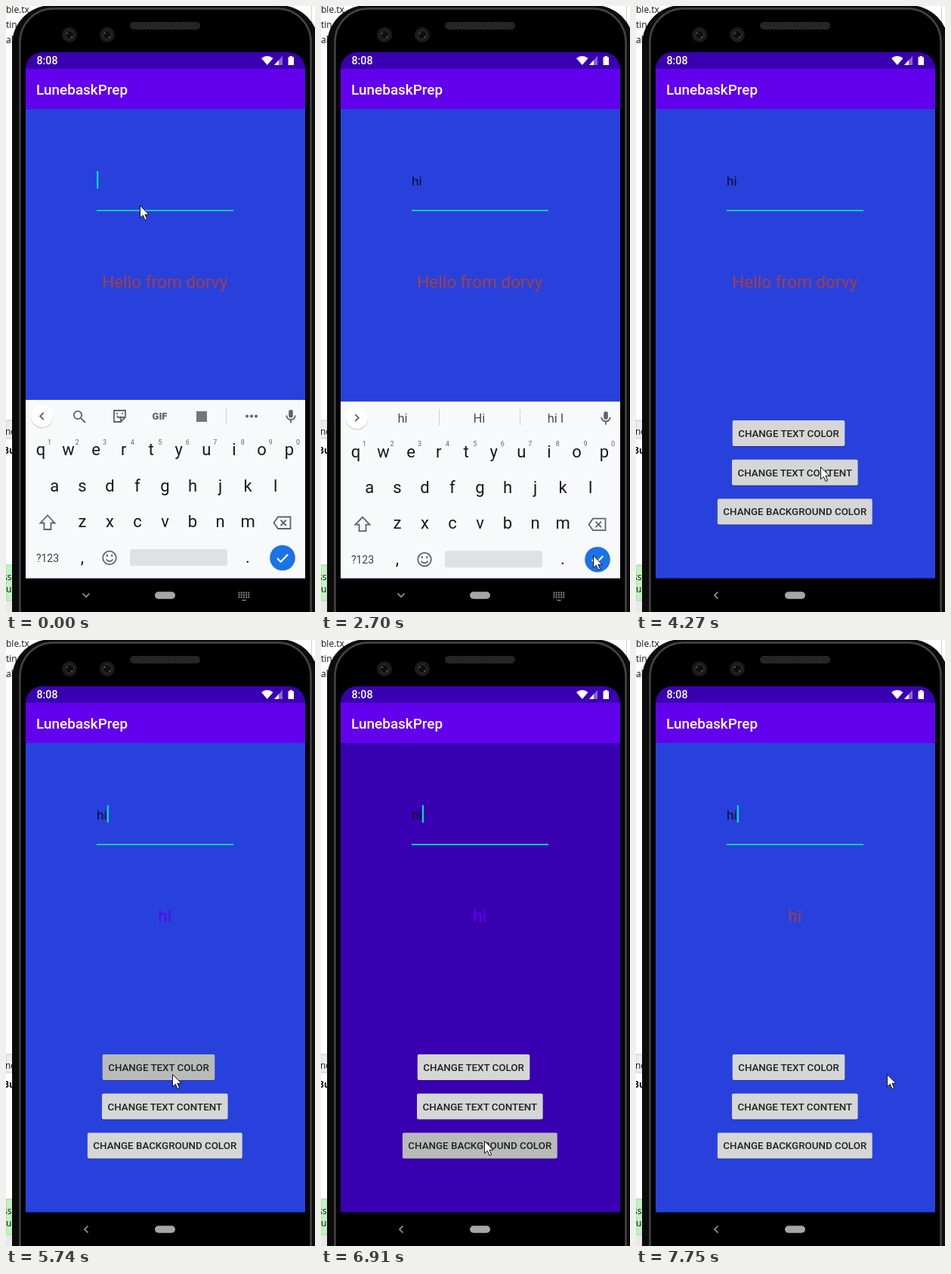
Recreate the animation shown at these times as an HTML page. Size 409 by 800 pixels, loop 8000 ms.

```html
<!DOCTYPE html>
<html lang="en">
<head>
<meta charset="utf-8">
<title>Phone screen</title>
<style>
  html, body { margin: 0; width: 100%; height: 100%; overflow: hidden; background: #fff; }
  svg { display: block; width: 409px; height: 800px; font-family: Roboto, sans-serif; }
  .mid, .key, .digit, .label, .word { text-anchor: middle; }
  .desk { font: 12px "Open Sans", sans-serif; fill: #111; }
  .key { font-size: 22px; fill: #17181a; }
  .digit { font-size: 9px; fill: #5f6368; }
  .label { font-size: 13.35px; font-weight: 500; fill: #222; }
  .word { font-size: 16.5px; fill: #4a4d52; }
  .icon { fill: none; stroke: #5f6368; stroke-width: 1.8; }
</style>
</head>
<body>
<svg viewBox="0 0 409 800">
  <defs>
    <clipPath id="display"><path d="M26 755.5V83a22 22 0 0 1 22-22H374a22 22 0 0 1 22 22V755.5z"/></clipPath>
    <pattern id="mesh" width="4" height="4" patternUnits="userSpaceOnUse">
      <rect width="4" height="4" fill="#1b1b1b"/><path d="M0 4L4 0M0 0l4 4" stroke="#343434" stroke-width=".8"/>
    </pattern>
  </defs>

  <!-- desktop behind the phone -->
  <rect width="409" height="800" fill="#fff"/>
  <path d="M404.5 0V60" stroke="#d0d0d0"/>
  <rect y="547" width="30" height="24" fill="#ececec" stroke="#c8c8c8"/>
  <rect y="738" width="30" height="47" fill="#c2f2c1" stroke="#9ccf9c"/>
  <rect y="786" width="30" height="14" fill="#e8e8e8"/>
  <g class="desk">
    <text y="9">ble.tx</text><text y="29">tin</text><text y="49">al</text>
    <text x="-1" y="566">nc</text><text x="-4" y="591" font-weight="700">Bu</text>
    <text x="-4" y="758">ss</text><text y="774">u</text>
  </g>

  <!-- phone body -->
  <rect x="8" y="-1" width="406" height="900" rx="52" fill="#0b0b0b"/>
  <rect x="18.5" y="3.5" width="385" height="900" rx="44" fill="#000" stroke="#444" stroke-width="2.5"/>
  <rect x="164" y="21" width="93" height="10" rx="5" fill="url(#mesh)"/>
  <g id="lenses"></g>

  <g clip-path="url(#display)">
    <rect id="page" x="26" y="136" width="370" height="620"/>
    <rect x="26" y="61" width="370" height="22" fill="#3900b1"/>
    <rect x="26" y="83" width="370" height="53" fill="#6200ee"/>
    <text x="40.500" y="77" font-size="14.200" font-weight="500" fill="#fff">8:08</text>
    <text x="40" y="117" font-size="18.900" font-weight="500" fill="#fff">LunebaskPrep</text>
    <g fill="#fff">
      <path d="M338 69q7.700-6 15.500 0L345.800 78z"/>
      <path d="M366 66v12H355z" opacity=".4"/><path d="M361 71.500V78H355z"/>
      <path d="M373.500 67.500h2v-1.500h3.500v1.500h2V78h-7.500z"/>
    </g>

    <text id="field" x="120" y="236.700" font-size="17.300" fill="#0b0c22"></text>
    <rect id="composing" x="120" y="238" height="1" fill="#0b0c22"/>
    <rect x="120" y="269" width="181" height="2" fill="#0cc9c9"/>
    <rect id="caret" y="218" width="2.300" height="23" fill="#06d3c8"/>
    <text id="message" class="mid" x="210.300" y="372" font-size="22.600"></text>
    <g id="buttons"></g>

    <g id="keyboard">
      <rect x="26" y="520" width="370" height="236" fill="#f7f9fb"/>
      <circle cx="47.500" cy="542.800" r="14.800" fill="#d5d7da"/>
      <circle cx="47.500" cy="541.500" r="14.500" fill="#fff"/>
      <path id="chevron" class="icon" d="M2.300-4.500L-2.300 0 2.300 4.500"/>
      <g id="tools">
        <circle class="icon" cx="95" cy="540" r="5.200"/><path class="icon" d="M99 544l6 6"/>
        <path class="icon" d="M143 534h15v9l-6 6h-9zM158 543h-6v6M147 541q2 4 5 1M147 537v2M154 537v2"/>
        <text class="mid" x="203.500" y="546" font-size="13" font-weight="900" fill="#5f6368">GIF</text>
        <rect x="252" y="535" width="14" height="14" fill="#73767a"/>
        <path d="M291.500 531V552" stroke="#cfd2d6"/>
        <path d="M319 541.500h13" stroke="#5f6368" stroke-width="4" stroke-linecap="round" stroke-dasharray="0 6"/>
      </g>
      <g id="suggestions">
        <path d="M156.500 530V552M263.500 530V552" stroke="#cfd2d6"/>
        <text class="word" x="108" y="547.500"></text>
        <text class="word" x="209.500" y="547.500"></text>
        <text class="word" x="310.500" y="547.500"></text>
      </g>
      <rect x="374.200" y="533" width="5.600" height="10.500" rx="2.800" fill="#5f6368"/>
      <path class="icon" d="M371.300 540.500a5.700 5.700 0 0 0 11.400 0M377 546.500v4"/>
      <g id="keys"></g>
      <path class="icon" d="M55 672.500l-9.500 10h5v8.500h9v-8.500h5z"/>
      <path class="icon" d="M360 674.500h16.500v15.500H360l-5.500-7.700zM363.500 678.500l7.500 7.500M371 678.500l-7.500 7.500"/>
      <text class="mid" x="55" y="733.500" font-size="14" fill="#3c4043">?123</text>
      <text class="key" x="101" y="735">,</text>
      <circle class="icon" cx="137" cy="728.500" r="8.800"/>
      <path class="icon" d="M132.500 730.500q4.500 5.500 9 0M133.800 724v3M140.200 724v3"/>
      <rect x="164" y="717" width="129" height="22" rx="3" fill="#dfe1e3"/>
      <text class="key" x="320" y="735">.</text>
      <circle cx="366" cy="728.500" r="16.800" fill="#1a73e8"/>
      <path d="M359 729l4.700 4.700 9.500-9.700" fill="none" stroke="#fff" stroke-width="2.200"/>
    </g>
  </g>

  <!-- navigation bar -->
  <rect x="197" y="773.300" width="27" height="9.400" rx="4.700" fill="#a6a6a6"/>
  <path id="back" d="M2.500-4.500L-2 0l4.500 4.500" fill="none" stroke="#999" stroke-width="1.700"/>
  <g id="switcher" fill="none" stroke="#8a8a8a">
    <path d="M307.500 774.500h15M307.500 777.500h15M307.500 780.500h15" stroke-width="2" stroke-dasharray="2 1.200"/>
    <path d="M312.500 784.500h5" stroke-width="1.500"/>
  </g>

  <path id="pointer" d="M.5.500V16.800l3.800-3.500 2.700 6.200 2.600-1.100-2.700-6.100H12z" fill="#fff" stroke="#111"/>
</svg>

<script>
const LOOP = 8000, BLINK = 500;
const BLUE = "#2841dc", DEEP = "#3900b1", RED = "#a53f48", PURPLE = "#6200ee";
const TYPE_H = 830, TYPE_I = 1050, CLOSE = 2580, CLOSED = 2970, RESET = 7750;
const $ = id => document.getElementById(id);

$("lenses").innerHTML = [84, 134].map(x => `
  <circle cx="${x}" cy="38" r="10" fill="#1a1b1c"/>
  <circle cx="${x}" cy="38" r="5.500" fill="#0c0d0f" stroke="#303234"/>
  <path d="M${x - 4} 36h2M${x + 2} 41h2" stroke="#666" stroke-width="1.500"/>`).join("");

// Every key row is centred on the screen with the same pitch.
$("keys").innerHTML = ["qwertyuiop", "asdfghjkl", "zxcvbnm"].map((letters, row) =>
  [...letters].map((letter, i) => {
    const x = 210.5 + (i - (letters.length - 1) / 2) * 36.55;
    const digit = row ? "" : `<text class="digit" x="${x + 11.5}" y="578.500">${(i + 1) % 10}</text>`;
    return `<text class="key" x="${x}" y="${593.3 + row * 47.2}">${letter}</text>${digit}`;
  }).join("")).join("");

// Buttons wrap their labels; each is pressed for a moment.
const buttons = [
  { label: "CHANGE TEXT COLOR", x: 202, down: 5740, up: 5890 },
  { label: "CHANGE TEXT CONTENT", x: 210.3, down: 4420, up: 4690 },
  { label: "CHANGE BACKGROUND COLOR", x: 210.3, down: 6910, up: 7180 }
];
const [recolor, rewrite, repaint] = buttons;
$("buttons").innerHTML = buttons.map(({ label, x }, i) => `
  <rect height="34.300" y="${547.7 + i * 51.7}" rx="2" fill="#111" opacity=".3"/>
  <rect height="34" y="${547 + i * 51.7}" rx="2"/>
  <text class="label" x="${x}" y="${569 + i * 51.7}">${label}</text>`).join("");
buttons.forEach((button, i) => {
  const [shadow, face, text] = [...$("buttons").children].slice(i * 3);
  const width = text.getComputedTextLength() + 15;
  for (const rect of [shadow, face]) {
    rect.setAttribute("width", width);
    rect.setAttribute("x", button.x - width / 2);
  }
  button.face = face;
});
const words = document.querySelectorAll(".word");

const pointerStart = [177, 263];
const pointerLegs = [
  { from: 1560, to: 1920, end: [270, 545] },
  { from: 1920, to: 2280, end: [351, 724] },
  { from: 2300, to: 2580, end: [360, 725] },
  { from: 2970, to: 3360, end: [243, 601] },
  { from: 3750, to: 4150, end: [244, 608] },
  { from: 5000, to: 5590, end: [220, 573] },
  { from: 5890, to: 6760, end: [216, 661] },
  { from: 7180, to: 7500, end: [332, 573] }
];
const progress = (t, from, to) => Math.min(1, Math.max(0, (t - from) / (to - from)));
const easeOut = u => 1 - (1 - u) ** 2;
const pointerAt = t => pointerLegs.reduce((at, { from, to, end }) => {
  const u = easeOut(progress(t, from, to));
  return at.map((value, i) => value + (end[i] - value) * u);
}, pointerStart);

// The caret blink restarts on each key stroke and when the keyboard closes.
const caretVisible = t => {
  const since = [-100, TYPE_H, TYPE_I, 2740].findLast(start => start <= t);
  return Math.floor((t - since) / BLINK) % 2 === 0;
};

const show = (id, visible) => $(id).setAttribute("visibility", visible ? "inherit" : "hidden");
const move = (id, x, y, turn = 0) =>
  $(id).setAttribute("transform", `translate(${x} ${y}) rotate(${turn})`);

function draw(t) {
  move("pointer", ...pointerAt(t));
  $("page").setAttribute("fill", t >= repaint.down && t < RESET ? DEEP : BLUE);

  const typed = t < TYPE_H ? "" : t < TYPE_I ? "h" : "hi";
  $("field").textContent = typed;
  const typedWidth = typed && $("field").getComputedTextLength();
  $("composing").setAttribute("width", t < CLOSE ? +typedWidth : 0);
  $("caret").setAttribute("x", 120 + +typedWidth);
  show("caret", caretVisible(t));

  $("message").textContent = t < rewrite.down + 120 ? "Hello from dorvy" : "hi";
  $("message").setAttribute("fill", t >= recolor.down && t < RESET ? PURPLE : RED);
  for (const { face, down, up } of buttons)
    face.setAttribute("fill", t >= down && t < up ? "#b9baba" : "#d5d6d6");

  const open = t < CLOSED;
  move("keyboard", 0, 240 * progress(t, CLOSE, CLOSED) ** 4);
  show("keyboard", open);
  show("switcher", open);
  move("back", 106, 778, open ? -90 : 0);

  const suggesting = t >= TYPE_H + 120;
  show("tools", !suggesting);
  show("suggestions", suggesting);
  move("chevron", 47.5, 541.5, suggesting ? 180 : 0);
  const guesses = [typed, typed.replace("h", "H"), `${typed} I`];
  words.forEach((word, i) => word.textContent = guesses[i]);
}

function tick() {
  draw(performance.now() % LOOP);
  requestAnimationFrame(tick);
}
tick();
</script>
</body>
</html>
```
